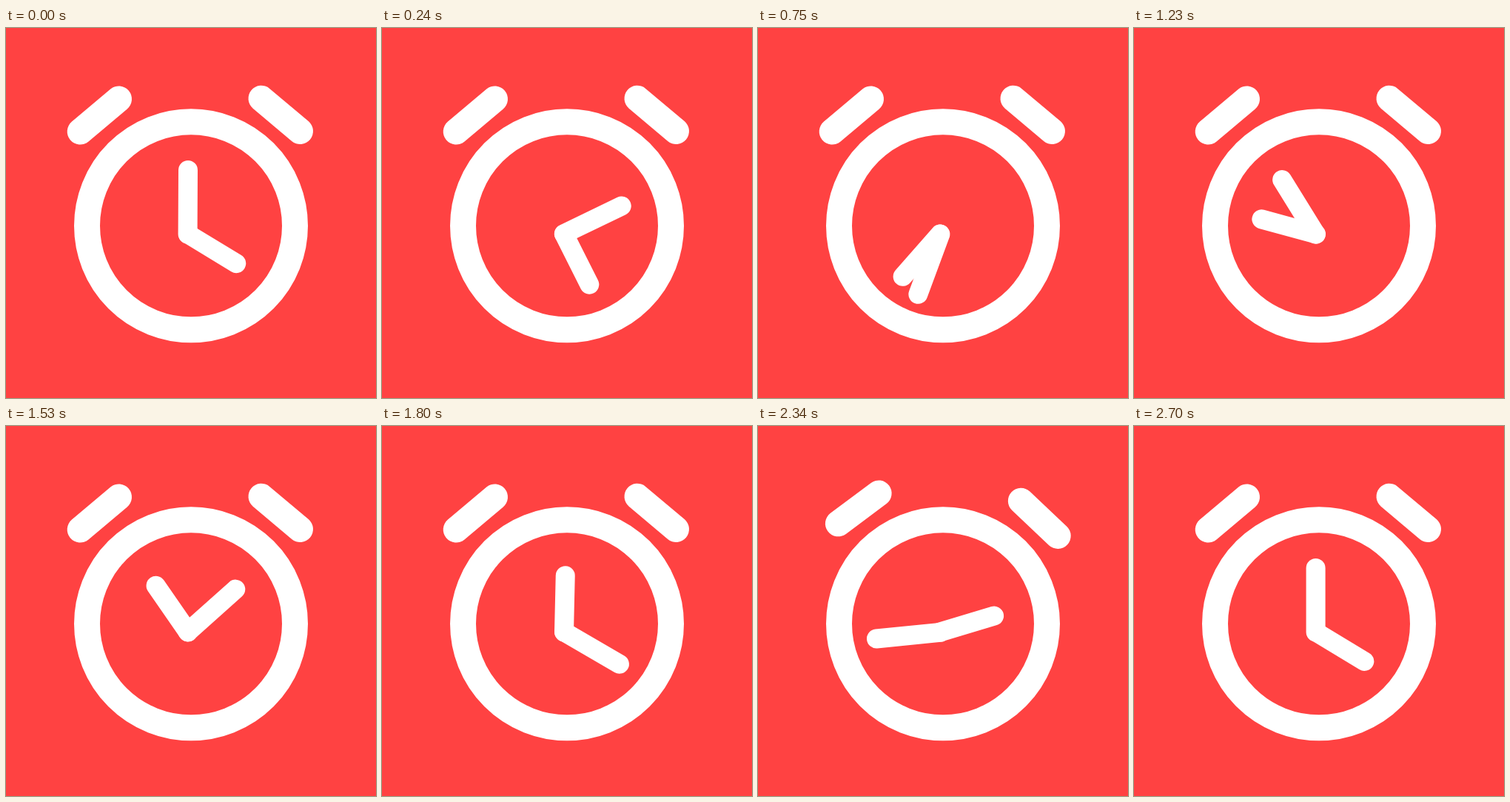
Recreate the animation shown at these times as an HTML page. Size 500x500 px, loop 2.73 s.

```html
<!DOCTYPE html>
<html lang="en">
<head>
<meta charset="utf-8">
<title>Alarm clock</title>
<style>
  html, body { margin: 0; width: 100%; height: 100%; overflow: hidden; background: #ff4242; }
  svg { display: block; width: 100%; height: 100%; fill: none; stroke: #fff; stroke-linecap: round; }
</style>
</head>
<body>
<svg viewBox="0 0 500 500">
  <circle cx="250" cy="267.3" r="140.5" stroke-width="35"/>
  <path id="bells" d="M100.2 140L152.5 96M345 95.3L397.5 139.5" stroke-width="35"/>
  <g stroke-width="26">
    <path id="minute" d="M245.6 278.5V192"/>
    <path id="hour" d="M246 278.5L311.3 318"/>
  </g>
</svg>
<script>
  const LOOP = 2730, TURN = 2700;
  const RING_START = 1950, SWING = 150;
  const swings = [0, 10, -10, 10, -10, 0];

  const rotate = (id, angle) =>
    document.getElementById(id).setAttribute('transform', `rotate(${angle} 246 278.5)`);

  // Sine-eased swing between successive angles
  function bellAngle(t) {
    const k = (t - RING_START) / SWING;
    if (k <= 0 || k >= swings.length - 1) return 0;
    const i = Math.floor(k);
    const ease = (1 - Math.cos((k - i) * Math.PI)) / 2;
    return swings[i] + (swings[i + 1] - swings[i]) * ease;
  }

  function draw(now) {
    const t = Math.min(now % LOOP, TURN);
    rotate('minute', 720 * t / TURN);
    rotate('hour', 360 * t / TURN);
    rotate('bells', bellAngle(t));
    requestAnimationFrame(draw);
  }
  requestAnimationFrame(draw);
</script>
</body>
</html>
```
